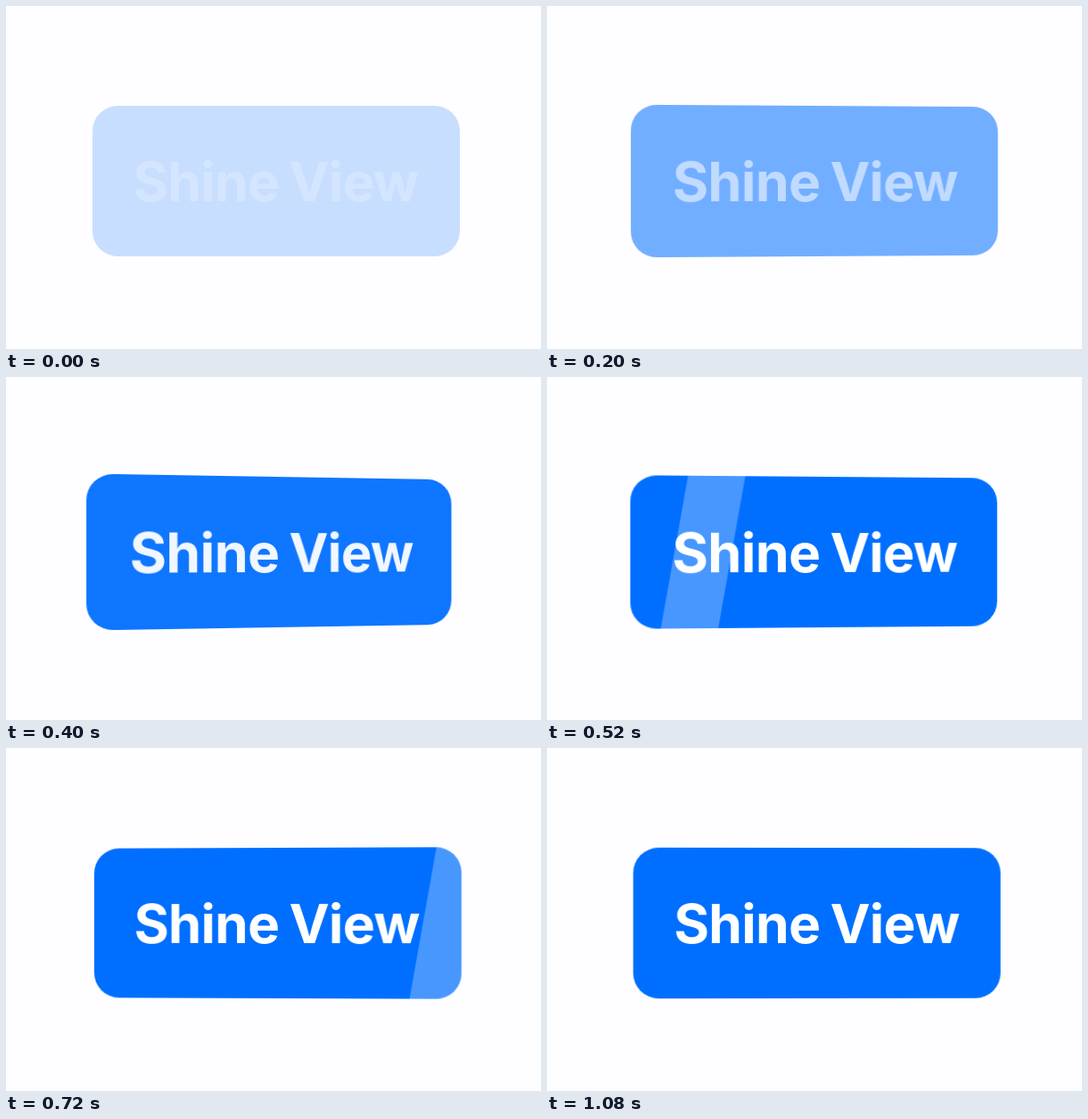
Recreate the animation shown at these times as an HTML page. Size 600x385 px, loop 1120 ms.

```html
<!DOCTYPE html>
<html lang="en">
<head>
<meta charset="utf-8">
<title>Shine View</title>
<style>
  html, body {
    margin: 0;
    width: 100%;
    height: 100%;
    overflow: hidden;
    background: #fefdff;
  }
  #card {
    position: absolute;
    left: 97px;
    top: 112px;
    width: 412px;
    height: 169px;
  }
  svg { display: block; width: 100%; height: 100%; }
  text {
    font: 670 60.5px Inter, Roboto, sans-serif;
    font-optical-sizing: none;
    letter-spacing: -0.7px;
    word-spacing: -2.5px;
    text-anchor: middle;
    fill: #fff;
  }
</style>
</head>
<body>
<div id="card">
  <svg viewBox="-206 -84.5 412 169">
    <clipPath id="shape">
      <rect x="-206" y="-84.5" width="412" height="169" rx="28.5"/>
    </clipPath>
    <g clip-path="url(#shape)">
      <rect id="fill" x="-206" y="-84.5" width="412" height="169" fill="#006fff"/>
      <rect id="shine" x="-31.5" y="-90" width="63" height="180" fill="#fff" fill-opacity=".28"/>
    </g>
    <text id="label" x="-0.4" y="22.2">Shine View</text>
  </svg>
</div>
<script>
  const LOOP = 1120, STEP = 40;
  const START = 80;        // the first pose holds until the step after this
  const PEAK = 370;        // strongest tilt, then a spring back to flat
  const MAX_TILT = 7.5;
  const FADE_END = 500;

  const [card, fill, shine, label] =
    ['card', 'fill', 'shine', 'label'].map(id => document.getElementById(id));

  const progress = (t, from, to) =>
    Math.min(1, Math.max(0, (t - from) / (to - from)));

  function spring(s) {
    const decay = 0.0037, speed = 0.008;
    return Math.exp(-decay * s) *
      (Math.cos(speed * s) + decay / speed * Math.sin(speed * s));
  }

  function tilt(t) {
    if (t > PEAK) return MAX_TILT * spring(t - PEAK);
    return MAX_TILT * Math.sin(progress(t, START, PEAK) * Math.PI / 2) ** 2;
  }

  const opacity = t =>
    0.21 + 0.79 * Math.sin(progress(t, START, FADE_END) * Math.PI / 2);

  const shineX = t => 1.608 * (t - 598.7);

  function draw(time) {
    const t = Math.max(START, Math.floor(time % LOOP / STEP) * STEP);

    card.style.transform = `perspective(650px) rotateY(${tilt(t)}deg)`;
    fill.setAttribute('fill-opacity', opacity(t));
    label.setAttribute('fill-opacity', opacity(t));
    shine.setAttribute('transform', `translate(${shineX(t)}) skewX(-10)`);
  }

  const start = performance.now();
  function tick() {
    draw(performance.now() - start);
    requestAnimationFrame(tick);
  }
  tick();
</script>
</body>
</html>
```
